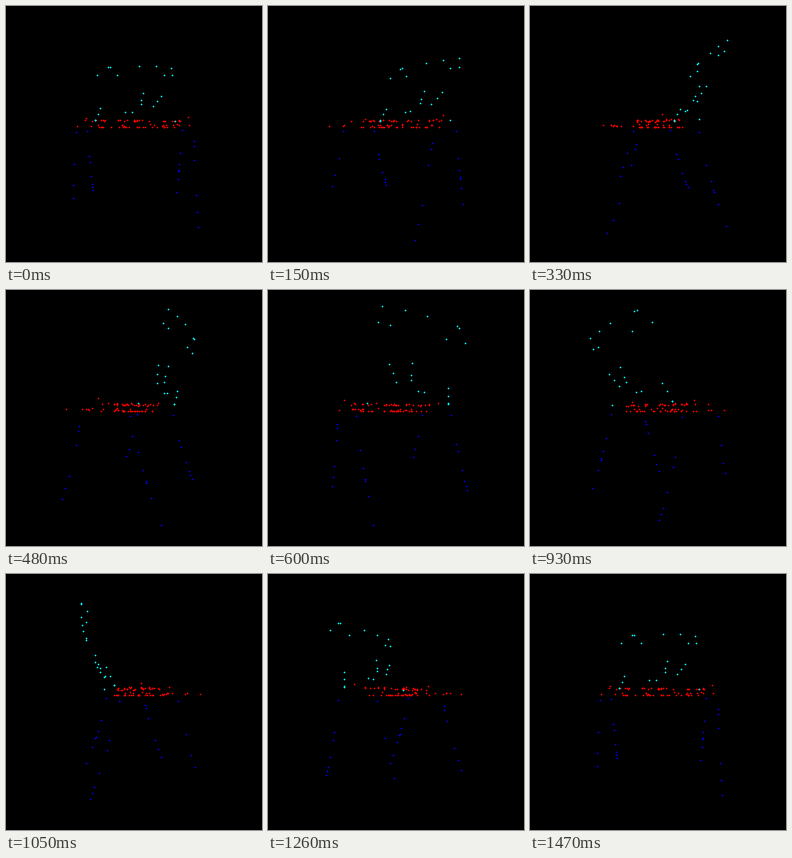
A matplotlib script for the animation above (1500 ms loop, 256x256 px).

```python
import numpy as np
import matplotlib.pyplot as plt
from matplotlib.animation import FuncAnimation

SIZE = 256
FRAMES = 50
CENTER_X, HORIZON = 128, 120   # screen position of the spin axis at eye level
DISTANCE = 220                 # camera distance, in stage pixels


# Points are (right, towards the viewer, up) in the first pose.
def backrest(right, up):
    """Points on the reclined plane of the chair back."""
    right, up = np.broadcast_arrays(right, up)
    return np.column_stack([right, -24 - 0.37 * up, up])


def spoke(foot, lean, *heights):
    up = np.array(heights)
    return backrest(foot + lean * up, up)


def make_back():
    rim = np.array([-33, -30, 5, 26, 45])
    return np.vstack([
        backrest(rim, 75 - 0.0013 * rim**2),
        backrest([-45, -21, 36, 46], 62.5),
        spoke(2, 0.2, 39.5, 30.4, 26),
        spoke(2, 0.82, 36, 30, 23.6),
        spoke(2, -0.3, 17),
        spoke(2, -0.74, 17),
        spoke(-47, 0.35, 21.5, 14.7, 7.5, 7),
        spoke(45, 0, 6),
    ])


def leg(side, front, *depths):
    """A leg that curves outwards as it goes down."""
    down = np.array(depths)
    right = side * (52.8 - 0.03 * down)
    near = front * (22.5 + 0.2 * down + 0.0013 * down**2)
    return np.column_stack([right, near, -down])


def make_legs():
    return np.vstack([
        leg(1, -1, 4, 30, 43, 50.5, 52, 62, 80),
        leg(-1, -1, 5, 34, 41, 58, 68, 72, 76),
        leg(1, 1, 13, 17, 29, 57, 69, 79),
        leg(-1, 1, 5, 32, 49, 59),
    ])


def spread(rng, count, right, near, up):
    """Random points inside a box."""
    low, high = np.transpose([right, near, up])
    return rng.uniform(low, high, (count, 3))


def make_seat():
    rng = np.random.default_rng(4)
    corners = [(52.5, 5.5, 9.7), (-50, -6, 8.5), (-45, 47, 0.5), (42, 50, 1)]
    return np.vstack([
        corners,
        spread(rng, 29, (-50, 50), (-20, 22), (5.2, 6.4)),    # top
        spread(rng, 22, (-40, 44), (-20, 20), (-0.5, -0.1)),  # underside
        spread(rng, 5, (-50, 50), (-18, 20), (1, 3)),         # sides
        spread(rng, 8, (-44, 44), (22, 46), (0.5, 2)),        # front lip
    ])


def project(points, angle):
    """Spin the points about the vertical axis and view them in perspective."""
    right, near, up = points.T
    c, s = np.cos(angle), np.sin(angle)
    scale = DISTANCE / (DISTANCE - (right * s + near * c))
    x = CENTER_X + scale * (right * c - near * s)
    y = HORIZON - scale * up
    return x + 0.5, y + 0.5


fig = plt.figure(figsize=(SIZE / 72, SIZE / 72), dpi=72, facecolor="black")
ax = fig.add_axes([0, 0, 1, 1])
ax.set_xlim(0, SIZE)
ax.set_ylim(SIZE, 0)
ax.axis("off")

parts = [
    (points, ax.plot([], [], "o", color=color, ms=1.7, mew=0)[0])
    for points, color in [(make_legs(), "#0000ff"), (make_seat(), "#ff0000"),
                          (make_back(), "#00ffff")]
]


def draw(frame):
    angle = 2 * np.pi * frame / (FRAMES - 1)
    for points, dots in parts:
        dots.set_data(*project(points, angle))
    return [dots for _, dots in parts]


anim = FuncAnimation(fig, draw, frames=FRAMES, interval=30, repeat=True,
                     repeat_delay=0)
plt.show()
```
